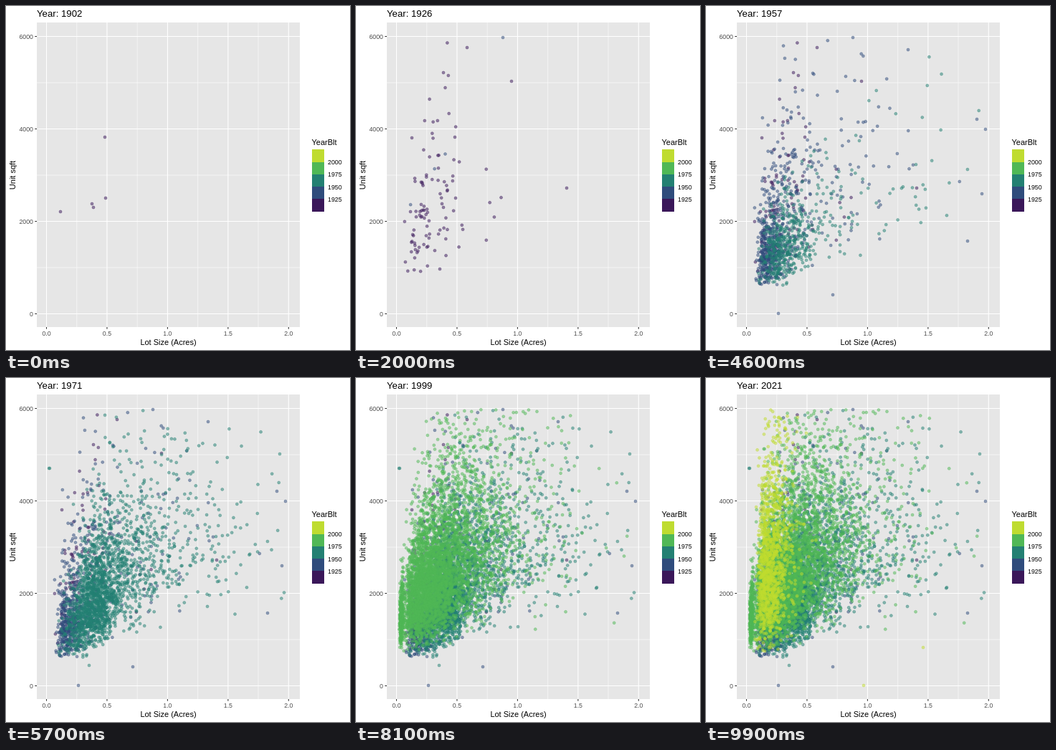
Animation of 480 by 480 pixels, one loop 10 s. Source, as an HTML page with a canvas:

```html
<!DOCTYPE html>
<html lang="en">
<head>
<meta charset="utf-8">
<title>Lot size and unit area by year built</title>
<style>
html, body { margin: 0; width: 100%; height: 100%; overflow: hidden; background: #fff; }
canvas { display: block; }
</style>
</head>
<body>
<canvas id="chart" width="480" height="480"></canvas>
<script>
const ctx = document.getElementById('chart').getContext('2d');
const FIRST = 1902, LAST = 2021, STEPS = 100, STEP_MS = 100;
const COLORS = ['#3a1759', '#2f4c7c', '#238073', '#50b856', '#bfdc30'];

const px = lot => 56.5 + lot * 168.9;
const py = sqft => 429.5 - sqft * 0.0645;
const stepOf = year => Math.round((year - FIRST) / (LAST - FIRST) * (STEPS - 1));
const colorOf = year => COLORS[Math.min(4, Math.max(0, Math.ceil((year - 1925) / 25)))];

let seed = 1902;
function rand() {
  seed = (seed + 0x6D2B79F5) | 0;
  let t = Math.imul(seed ^ seed >>> 15, 1 | seed);
  t = t + Math.imul(t ^ t >>> 7, 61 | t) ^ t;
  return ((t ^ t >>> 14) >>> 0) / 4294967296;
}
const normal = () => Math.sqrt(-2 * Math.log(1 - rand())) * Math.cos(2 * Math.PI * rand());

// Isolated points: x, y, year
const loners = [
  [76, 287, 1902], [120, 276, 1902], [122, 281, 1902], [139, 268, 1902], [138, 183, 1902],
  [155, 58, 1912], [122, 93, 1914], [217, 105, 1911], [294, 254, 1920], [205, 44, 1926],
  [101, 429, 1948], [177, 403, 1947], [390, 172, 1938], [378, 158, 1936], [282, 61, 1945],
  [365, 328, 1946], [60, 126, 1963], [61, 126, 1965], [382, 106, 1966], [116, 401, 1964],
  [220, 429, 2003], [303, 376, 2010]
];

// Clouds: first and last year, count, lot median and spread, sqft median and spread
const clouds = [
  [1903, 1926, 100, .27, .5, 2350, .42],
  [1927, 1949, 330, .19, .32, 1280, .32],
  [1927, 1949, 230, .35, .6, 2700, .36],
  [1950, 1957, 510, .32, .42, 1500, .31],
  [1950, 1985, 330, 1, .4, 2850, .34],
  [1958, 1975, 1150, .43, .24, 1950, .3],
  [1958, 1985, 1000, .62, .4, 2900, .31],
  [1976, 1985, 750, .34, .42, 1900, .29],
  [1978, 2000, 310, .04, .23, 1530, .23],
  [1986, 2000, 2500, .24, .52, 2350, .3],
  [1986, 2000, 950, .5, .4, 3300, .32],
  [2001, 2021, 1300, .2, .35, 2700, .4]
];

function makePoints() {
  const points = [];
  const add = (x, y, year) => points.push({ x, y, step: stepOf(year), color: colorOf(year) });

  loners.forEach(p => add(...p));
  for (const [from, to, count, lotMid, lotVar, sqftMid, sqftVar] of clouds) {
    for (let left = count; left > 0;) {
      const z = normal() * lotVar;
      const lot = lotMid * Math.exp(z);
      const sqft = sqftMid * Math.exp(normal() * sqftVar + .3 * z);
      const floor = Math.min(1150, Math.max(620, lot * 1900));
      if (lot < .022 || lot > 1.98 || sqft > 5980 || sqft < floor) continue;
      let year = from + Math.floor((to - from + 1) * rand());
      if (year < 1917 && (lot < .1 || lot > 1.07 || sqft < 1080)) year = 1917 + year % 8;
      add(px(lot), py(sqft), year);
      left--;
    }
  }
  return points.sort((a, b) => a.step - b.step);
}

function line(x1, y1, x2, y2, width, color) {
  ctx.lineWidth = width;
  ctx.strokeStyle = color;
  ctx.beginPath();
  ctx.moveTo(x1, y1);
  ctx.lineTo(x2, y2);
  ctx.stroke();
}

function label(text, x, y, size, align = 'left', color = '#000') {
  ctx.font = `${size}px "Liberation Sans", Arial, sans-serif`;
  ctx.textAlign = align;
  ctx.fillStyle = color;
  ctx.fillText(text, x, y);
}

function drawBase() {
  ctx.fillStyle = '#fff';
  ctx.fillRect(0, 0, 480, 480);
  ctx.fillStyle = '#e6e6e6';
  ctx.fillRect(43, 23, 367, 425);

  for (let i = 0; i < 4; i++) {
    const x = px(.25 + i / 2);
    line(x, 23, x, 448, .55, '#fff');
    if (i < 3) line(43, py(1000 + i * 2000), 410, py(1000 + i * 2000), .55, '#fff');
  }
  for (let i = 0; i < 5; i++) {
    const x = px(i / 2);
    line(x, 23, x, 448, 1.07, '#fff');
    line(x, 448, x, 450.7, 1.07, '#333');
    label((i / 2).toFixed(1), x, 460, 8.8, 'center', '#4d4d4d');
  }
  for (let v = 0; v <= 6000; v += 2000) {
    const y = py(v);
    line(43, y, 410, y, 1.07, '#fff');
    line(40.3, y, 43, y, 1.07, '#333');
    label(v, 38, y + 3, 8.8, 'right', '#4d4d4d');
  }

  label('Lot Size (Acres)', 226.5, 473, 11, 'center');
  ctx.save();
  ctx.translate(13, 236);
  ctx.rotate(-Math.PI / 2);
  label('Unit sqft', 0, 0, 11, 'center');
  ctx.restore();

  label('YearBlt', 426.5, 194, 11);
  COLORS.forEach((color, i) => {
    const top = Math.round(269.4 - i * 17.3);
    ctx.fillStyle = color;
    ctx.fillRect(427, top, 17, Math.round(286.7 - i * 17.3) - top);
    if (i < 4) label(1925 + i * 25, 449, 273 - i * 17.3, 8.8);
  });
}

function drawPoint(p) {
  ctx.fillStyle = ctx.strokeStyle = p.color;
  ctx.beginPath();
  ctx.arc(p.x, p.y, 2, 0, 2 * Math.PI);
  ctx.fill();
  ctx.stroke();
}

const points = makePoints();
let shown = -1, next = 0;

function draw(step) {
  if (step === shown) return;
  if (step < shown || shown < 0) {
    drawBase();
    next = 0;
  }
  shown = step;
  ctx.globalAlpha = .5;
  ctx.lineWidth = .7;
  while (next < points.length && points[next].step <= step) drawPoint(points[next++]);
  ctx.globalAlpha = 1;
  ctx.fillStyle = '#fff';
  ctx.fillRect(0, 0, 480, 22);
  label('Year: ' + Math.round(FIRST + step * (LAST - FIRST) / (STEPS - 1)), 43, 15, 13.2);
}

const start = performance.now();
function tick() {
  draw(Math.floor((performance.now() - start) / STEP_MS) % STEPS);
  requestAnimationFrame(tick);
}
tick();
</script>
</body>
</html>
```
